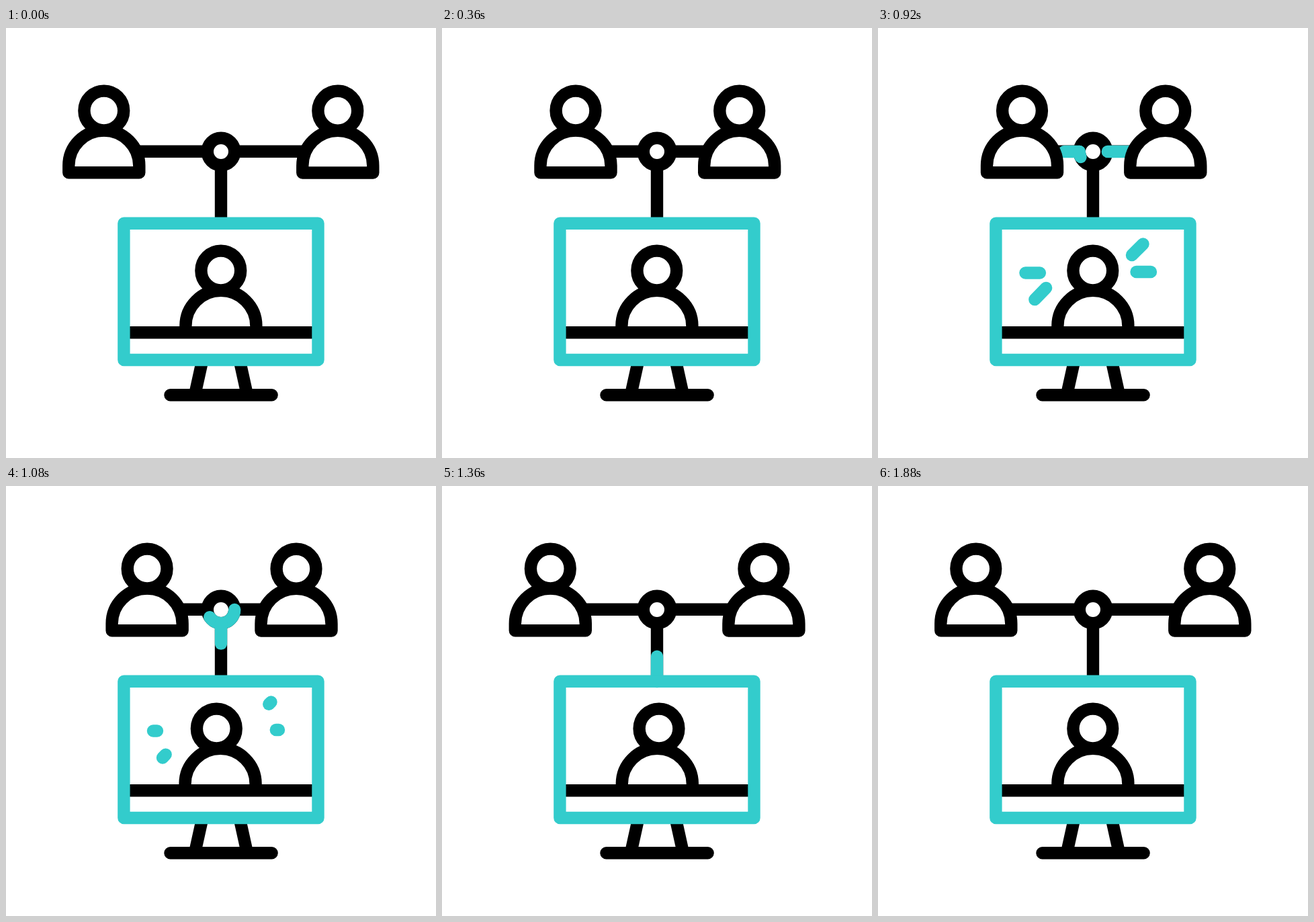
Recreate the animation shown at these times as an HTML page. Size 640x640 px, loop 2280 ms.

```html
<!DOCTYPE html>
<html lang="en">
<head>
<meta charset="utf-8">
<title>Video conference</title>
<style>
  html, body { margin: 0; width: 100%; height: 100%; overflow: hidden; background: #fff; }
  svg { display: block; width: 100%; height: 100%; }
</style>
</head>
<body>
<svg viewBox="0 0 640 640" fill="none" stroke="#000" stroke-width="18.4" stroke-linejoin="round">
  <defs>
    <g id="person" fill="#fff">
      <path d="M-52.5 92.3V82A52.5 52.5 0 0 1 52.5 82V92.3Z"/>
      <circle r="29.4"/>
    </g>
  </defs>

  <path id="wire"/>
  <path d="M320 204V291"/>
  <circle cx="320" cy="184" r="20.2" fill="#fff"/>
  <g id="pulses" stroke="#3cc" stroke-linecap="round"></g>
  <use id="left" href="#person"/>
  <use id="right" href="#person"/>

  <path d="M292.5 494L281 546M347.5 494L359 546"/>
  <path d="M244.5 546.2H395.6" stroke-linecap="round"/>
  <path id="body" d="M267.4 453V443.3A52.5 52.5 0 0 1 372.4 443.3V453"/>
  <circle id="head" cx="319.8" cy="361" r="29.4" fill="#fff"/>
  <path d="M176 453.3H464"/>
  <rect x="175.4" y="290.8" width="289.1" height="203.2" stroke="#3cc"/>
  <g id="rays" stroke="#3cc" stroke-linecap="round"></g>
</svg>
<script>
const LOOP = 2280, STEP = 40;
const $ = id => document.getElementById(id);

// Smooth progress from 0 to 1 between two times
function ease(t, from, to) {
  const u = Math.min(1, Math.max(0, (t - from) / (to - from)));
  return u * u * (3 - 2 * u);
}

// Each stroke: path, start and end time of its front, then of its tail
function makeStrokes(parent, list) {
  return list.map(([d, ...times]) => {
    const el = document.createElementNS("http://www.w3.org/2000/svg", "path");
    el.setAttribute("d", d);
    el.setAttribute("pathLength", 100);
    $(parent).append(el);
    return { el, times };
  });
}

const strokes = [
  ...makeStrokes("pulses", [
    ["M255 184H299.8", 720, 900, 840, 1000],
    ["M385 184H340.2", 760, 940, 880, 1080],
    ["M299.8 184A20.2 20.2 0 0 0 320 204.2", 880, 1000, 980, 1220],
    ["M340.2 184A20.2 20.2 0 0 1 320 204.2", 920, 1040, 1080, 1280],
    ["M320 204V291", 960, 1260, 1100, 1575]
  ]),
  ...makeStrokes("rays", [
    ["M376 340L394.5 321.5", 660, 900, 860, 1160],
    ["M382 363H406", 660, 900, 860, 1160],
    ["M242 364.5H219", 700, 940, 880, 1180],
    ["M251 386L233 404.5", 700, 940, 880, 1180]
  ])
];

const sway = [[520, 0], [760, 6.5], [1080, -6.5], [1360, 3.2], [1600, -3], [1880, 0]];

function swayAt(t) {
  let x = 0;
  for (let i = 1; i < sway.length; i++) {
    const [t0, x0] = sway[i - 1], [t1, x1] = sway[i];
    x += (x1 - x0) * ease(t, t0, t1);
  }
  return x;
}

function trim({ el, times: [f0, f1, t0, t1] }, t) {
  const front = 100 * ease(t, f0, f1), tail = 100 * ease(t, t0, t1);
  el.style.display = t > f0 && t < t1 ? "" : "none";
  el.setAttribute("stroke-dasharray", `${Math.max(0.01, front - tail)} 300`);
  el.setAttribute("stroke-dashoffset", -tail);
}

function draw(t) {
  const near = ease(t, 0, 520) - ease(t, 1000, 1520);
  const left = 145.8 + 68.7 * near, right = 493.8 - 66 * near;
  $("left").setAttribute("transform", `translate(${left} 123)`);
  $("right").setAttribute("transform", `translate(${right} 123.2)`);
  $("wire").setAttribute("d", `M${left} 183.8H${right}`);

  const x = swayAt(t);
  $("head").setAttribute("transform", `translate(${x} 0)`);
  $("body").setAttribute("transform", `translate(${x * 0.13} 0)`);
  strokes.forEach(s => trim(s, t));
}

const start = performance.now();
function tick() {
  const t = (performance.now() - start) % LOOP;
  draw(Math.floor(t / STEP) * STEP);
  requestAnimationFrame(tick);
}
tick();
</script>
</body>
</html>
```
